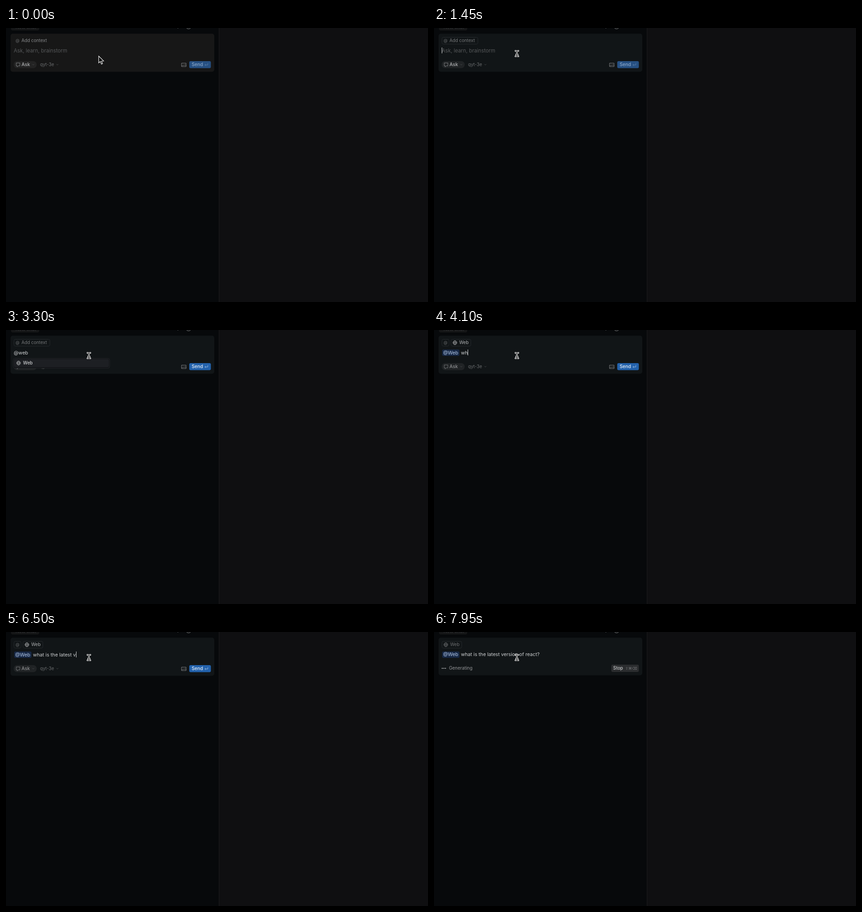
Animation of 928 by 604 pixels, one loop 8000 ms. Source, as an HTML page with a canvas:

```html
<!DOCTYPE html>
<html lang="en">
<head>
<meta charset="utf-8">
<title>Chat prompt</title>
<style>
html, body { margin: 0; width: 100%; height: 100%; overflow: hidden; background: #08090b; }
canvas { display: block; width: 928px; height: 604px; }
</style>
</head>
<body>
<canvas id="stage" width="928" height="604"></canvas>
<script>
const c = document.getElementById('stage').getContext('2d');
const LOOP = 8000, BLINK = 500;
const FOCUS = 450, MENU_OPEN = 1950, SELECT = 3550, SUBMIT = 7950;
const LEFT = 17, TEXT_SIZE = 10.7, SMALL = 9.75;

// Each chunk is typed evenly between its first and last key press.
const MENTION = [['@', 1900, 1900], ['web', 2350, 2800]];
const PROMPT = [
  ['what ', 3950, 4300], ['is ', 4550, 4700], ['the ', 4800, 5350], ['latest ', 5700, 6300],
  ['version ', 6500, 6950], ['of ', 6980, 7180], ['react?', 7350, 7800]
];
const MENU = ['Files & folders', 'Code', 'Docs', 'Git', 'Past chats', 'Rules', 'Terminals', 'Linter errors', 'Web'];

const ramp = (t, a, b) => Math.max(0, Math.min(1, (t - a) / (b - a)));
const easeOut = k => 1 - (1 - k) ** 3;
const mix = (a, b, k) => `rgb(${a.map((v, i) => Math.round(v + (b[i] - v) * k))})`;
const grey = v => `rgb(${v}, ${v + 2}, ${v + 4})`;

function typing(chunks, t, idle) {
  let shown = '', last = idle;
  for (const [word, from, to] of chunks) {
    const step = (to - from) / Math.max(1, word.length - 1);
    [...word].forEach((ch, i) => {
      const at = from + i * step;
      if (at <= t) { shown += ch; last = at; }
    });
  }
  return { shown, last };
}

function box(x, y, w, h, r, fill, edge) {
  c.beginPath();
  c.roundRect(x, y, w, h, r);
  if (fill) { c.fillStyle = fill; c.fill(); }
  if (edge) { c.strokeStyle = edge; c.lineWidth = 1; c.stroke(); }
}

// Draws text and returns its right edge.
function text(s, x, y, size, color, weight = 400) {
  c.font = `${weight} ${size}px Inter, "Liberation Sans", sans-serif`;
  c.fillStyle = color;
  c.fillText(s, x, y);
  return x + c.measureText(s).width;
}

function icon(path, x, y, color, w = 1, fill) {
  const p = new Path2D(path);
  c.save();
  c.translate(x, y);
  if (fill) { c.fillStyle = fill; c.fill(p); }
  c.strokeStyle = color;
  c.lineWidth = w;
  c.stroke(p);
  c.restore();
}

function ring(x, y, rx, ry, color) {
  c.beginPath();
  c.ellipse(x, y, rx, ry, 0, 0, Math.PI * 2);
  c.strokeStyle = color;
  c.lineWidth = 0.9;
  c.stroke();
}

function globe(x, y, color) {
  ring(x, y, 4.2, 4.2, color);
  ring(x, y, 1.9, 4.2, color);
  icon('M-4.2 0H4.2', x, y, color, 0.9);
}

const chevron = x => icon('M-2 -1L0 1L2 -1', x, 80.7, grey(72));

function backdrop() {
  c.fillStyle = '#07090b';
  c.fillRect(0, 0, 468, 604);
  c.fillStyle = '#0f0f11';
  c.fillRect(468, 0, 460, 604);
  c.fillStyle = '#1b1c1e';
  c.fillRect(468, 0, 1, 604);
  box(11, -12, 62, 17.5, 4, '#151617');
  text('New chat', 21, 1.5, 10, grey(48), 500);
  icon('M0 0V7', 378, -6, grey(138));
  ring(401.5, -4, 6, 6, grey(138));
}

function chip(x, w) {
  box(x + 0.5, 20.5, w - 1, 15, 3, null, '#25292c');
}

function webChip(x, color) {
  chip(x, 44.5);
  globe(x + 9, 28, color);
  text('Web', x + 18.4, 31.4, SMALL, color);
}

function contextRow(t, k) {
  if (t >= SUBMIT) return webChip(LEFT, grey(110));
  text('@', 21, 31, 9, grey(104));
  if (t >= SELECT) {
    chip(LEFT, 16.5);
    webChip(37, grey(176));
  } else {
    if (k > 0) chip(LEFT, 80);
    text('Add context', 34, 31.4, SMALL, grey(Math.round(136 - 18 * k)));
  }
}

function prompt(t) {
  const picked = t >= SELECT;
  const { shown, last } = picked ? typing(PROMPT, t, SELECT) : typing(MENTION, t, FOCUS);
  const y = t < SUBMIT ? 53.8 : 53.4;
  let x = LEFT;
  if (picked) {
    box(18, 43, 38, 14, 3, '#172845');
    text('@Web', 20.3, y, TEXT_SIZE, '#b3c9e8');
    x = 59.3;
  } else if (!shown) {
    text('Ask, learn, brainstorm', x, 54, 11.35, grey(86));
  }
  const end = text(shown, x, y, TEXT_SIZE, grey(206));
  const lit = t >= last && Math.floor((t - last) / BLINK) % 2 === 0;
  if (lit && t < SUBMIT) {
    c.fillStyle = grey(208);
    c.fillRect(Math.round(end), 43, 1, 13);
  }
}

function controls(t, k) {
  const picked = t >= SELECT;
  box(LEFT, 73, 50.5, 15.5, 7.5, mix([35, 35, 35], [32, 35, 37], k));
  icon('M0 0H8V6.5H4.5L2 8.7V6.5H0Z', 22.5, 77, grey(picked ? 106 : 120));
  text('Ask', 34, 84.4, 10.2, grey(picked ? 142 : 160), picked ? 500 : 600);
  chevron(60);
  text('qyt-3e', 75, 84.4, SMALL, grey(108));
  chevron(113);
  icon('M0 0H10V7.5H0ZM0.5 6.5L3.5 3.5L5.5 5.5L7.5 3L10 6', 386, 77.5, grey(126));

  const lit = ramp(t, 1900, 2050);
  box(403, 73, 47.5, 15.5, 3, mix([38, 80, 130], [35, 98, 172], lit));
  text('Send', 408.2, 84.4, 10.2, mix([140, 168, 200], [232, 239, 247], lit), 500);
  icon('M6.5 -4V0H0M2.2 -2.2L0 0L2.2 2.2', 437.3, 81.5, mix([92, 126, 166], [156, 190, 228], lit), 0.9);
}

function generating() {
  for (let i = 0; i < 3; i++) box(17 + i * 3.6, 79, 2.2, 2.2, 1.1, grey(200));
  text('Generating', 33, 83.4, 9.9, grey(148));
  box(390, 72, 60.5, 16, 3, '#2b2d2f');
  text('Stop', 394, 83.4, 9.9, grey(198), 500);
  c.font = '8px "DejaVu Sans", sans-serif';
  c.fillStyle = grey(116);
  c.fillText('\u21e7\u2318\u232b', 420.5, 83);
}

function menu(t) {
  if (t < MENU_OPEN || t >= SELECT) return;
  const rows = t < MENTION[1][1] ? MENU : ['Web'];
  const step = 19.6;
  box(15.5, 62.5, 212.5, 21.5 + (rows.length - 1) * step, 4, '#0e1013', '#24272a');
  box(17, 64, 209.5, 18, 3, '#1d1f23');
  rows.forEach((name, i) => {
    const y = 72.8 + i * step;
    if (name === 'Web') globe(27.6, y, grey(184));
    else box(24, y - 3.5, 7, 7, 1.5, null, grey(138));
    text(name, 37.6, y + 3.5, SMALL, grey(206), 500);
  });
}

function pointer(t) {
  const k = easeOut(ramp(t, 0, 850));
  const x = 204 - 22 * k, y = 62 - 6 * k;
  if (t < 150) {
    icon('M0 0V15L3.5 11.8L6 17.6L8.4 16.5L6 11L10.8 10.8Z', x, y, '#f2f2f2', 1.2, '#050505');
    return;
  }
  const beam = 'M-3 -6Q0 -6 0 -4Q0 -6 3 -6M0 -4V4M-3 6Q0 6 0 4Q0 6 3 6M-1.5 2.5H1.5';
  c.lineCap = 'square';
  icon(beam, x + 0.3, y + 0.3, '#f0f0f0', 3.2);
  icon(beam, x + 0.3, y + 0.3, '#080808', 1.1);
  c.lineCap = 'butt';
}

function draw(t) {
  const k = ramp(t, 50, 850);
  backdrop();
  box(10, 12.5, 448, t < SUBMIT ? 84 : 83, 5, mix([23, 23, 23], [17, 21, 23], k));
  contextRow(t, k);
  prompt(t);
  if (t < SUBMIT) controls(t, k);
  else generating();
  menu(t);
  pointer(t);
}

const start = performance.now();
function tick() {
  draw((performance.now() - start) % LOOP);
  requestAnimationFrame(tick);
}
tick();
</script>
</body>
</html>
```
